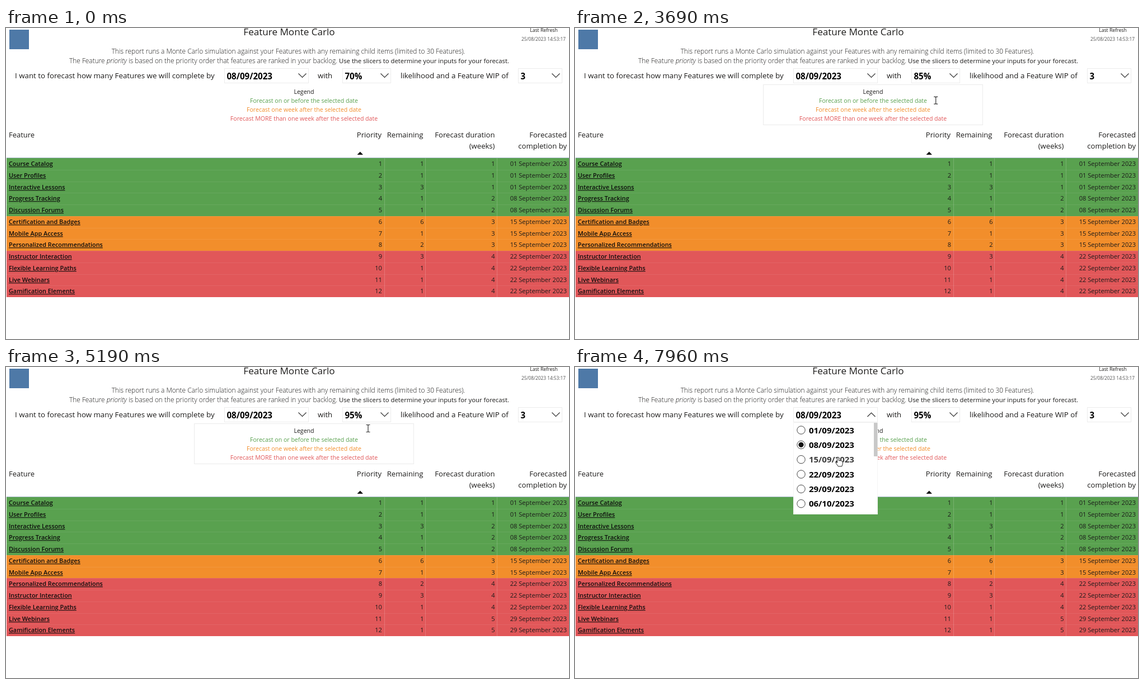
Recreate the animation shown at these times as an HTML page. Size 1006 px wide and 557 px high, loop 8 s.

```html
<!DOCTYPE html>
<html lang="en">
<head>
<meta charset="utf-8">
<title>Feature Monte Carlo</title>
<style>
  html, body { margin: 0; width: 100%; height: 100%; overflow: hidden; background: #fff; }
  svg { display: block; width: 100%; height: 100%; }
  text { font-family: "Open Sans", "Noto Sans", sans-serif; white-space: pre; }
</style>
</head>
<body>
<svg id="stage" viewBox="0 0 1006 557"></svg>
<script>
const LOOP = 8000, STEP = 70;
const INK = '#1c1b1a', GREEN = '#59a14f', ORANGE = '#f28e2b', RED = '#e15759';
const ROW_TOP = 233, ROW_H = 20.75, OPTION_H = 26.35, POPUP_TOP = 99;
const stage = document.getElementById('stage');

function add(parent, tag, attrs = {}, content) {
  const node = document.createElementNS('http://www.w3.org/2000/svg', tag);
  for (const key in attrs) node.setAttribute(key, attrs[key]);
  if (content !== undefined) node.textContent = content;
  return parent.appendChild(node);
}
const group = (parent = stage) => add(parent, 'g');
const rect = (parent, x, y, width, height, attrs) => add(parent, 'rect', { x, y, width, height, ...attrs });
const path = (parent, d, attrs) => add(parent, 'path', { d, fill: 'none', ...attrs });
const text = (parent, x, y, size, content, attrs) =>
  add(parent, 'text', { x, y, 'font-size': size, fill: INK, ...attrs }, content);
const show = (node, on) => { node.style.display = on ? '' : 'none'; };
const END = { 'text-anchor': 'end' }, MIDDLE = { 'text-anchor': 'middle' };
const LIGHT = { 'font-weight': 300 }, BOLD = { 'font-weight': 700, fill: '#000' };

// Heading
rect(stage, 6, 3, 35, 35, { fill: '#4e79a7' });
text(stage, 506, 12.5, 17.1, 'Feature Monte Carlo', MIDDLE);
text(stage, 961, 6.5, 8.7, 'Last Refresh', MIDDLE);
text(stage, 960.5, 23, 8.3, '25/08/2023 14:53:17', { ...MIDDLE, fill: '#555' });
text(stage, 504.5, 45.5, 11.88, 'This report runs a Monte Carlo simulation against your Features with any remaining child items (limited to 30 Features).', { ...MIDDLE, ...LIGHT });
const intro = text(stage, 592, 62.5, 11.88, '', { ...END, ...LIGHT });
add(intro, 'tspan', {}, 'The Feature ');
add(intro, 'tspan', { 'font-style': 'italic' }, 'priority');
add(intro, 'tspan', {}, ' is based on the priority order that features are ranked in your backlog.');
text(stage, 595, 62.5, 11.3, 'Use the slicers to determine your inputs for your forecast.');
text(stage, 16, 89.5, 13.3, 'I want to forecast how many Features we will complete by');
text(stage, 557, 89.5, 13.1, 'with');
text(stage, 705, 89.5, 13.35, 'likelihood and a Feature WIP of');

// Legend
const legendFrame = rect(stage, 336.5, 101.5, 392, 72, { fill: 'none', stroke: '#ebebeb' });
[['Legend', INK],
 ['Forecast on or before the selected date', GREEN],
 ['Forecast one week after the selected date', ORANGE],
 ['Forecast MORE than one week after the selected date', RED]
].forEach(([label, fill], i) => text(stage, 532.5, 118 + i * 16, 10.58, label, { ...MIDDLE, fill }));

// Table
const features = [
  ['Course Catalog', 1], ['User Profiles', 1], ['Interactive Lessons', 3],
  ['Progress Tracking', 1], ['Discussion Forums', 1], ['Certification and Badges', 6],
  ['Mobile App Access', 1], ['Personalized Recommendations', 2], ['Instructor Interaction', 3],
  ['Flexible Learning Paths', 1], ['Live Webinars', 1], ['Gamification Elements', 1]
];
text(stage, 5, 195.5, 13, 'Feature');
text(stage, 671, 195.5, 13.05, 'Priority', END);
text(stage, 745.5, 195.5, 13.1, 'Remaining', END);
text(stage, 873.5, 195.5, 13.1, 'Forecast duration', END);
text(stage, 873.5, 215.5, 13.1, '(weeks)', END);
text(stage, 1002, 195.5, 13.1, 'Forecasted', END);
text(stage, 1002, 215.5, 13.1, 'completion by', END);
path(stage, 'M627.5 227h10.5l-5.2-5.5z', { fill: '#111' });

function buildTable(weeks) {
  const table = group();
  features.forEach(([name, remaining], i) => {
    const top = Math.round(ROW_TOP + i * ROW_H), base = top + 14.2, w = weeks[i];
    const bottom = Math.round(ROW_TOP + (i + 1) * ROW_H);
    const fill = w <= 2 ? GREEN : w === 3 ? ORANGE : RED;
    rect(table, 1, top, 1005, bottom - top, { fill });
    if (i) path(table, `M1 ${top + 0.5}H1006`, { stroke: '#fff', 'stroke-opacity': 0.08 });
    text(table, 5, base, 10.85, name, { fill: '#0c0c0c', 'font-weight': 600, 'text-decoration': 'underline' });
    const day = String(7 * w - 6).padStart(2, '0');
    [[672, i + 1], [746.5, remaining], [873.5, w], [1002, `${day} September 2023`]]
      .forEach(([x, value]) => text(table, x, base, 11.15, value, END));
  });
  for (const x of [676.5, 749.5, 877.5])
    path(table, `M${x} ${ROW_TOP}V482`, { stroke: '#fff', 'stroke-opacity': 0.18 });
  path(table, 'M1 232.5H1006', { stroke: '#a9bccb' });
  return table;
}
const tableBefore = buildTable([1, 1, 1, 2, 2, 3, 3, 3, 4, 4, 4, 4]);
const tableAfter = buildTable([1, 1, 2, 2, 2, 3, 3, 4, 4, 4, 5, 5]);

// Slicers
function buildSlicer(x, width, value, options = []) {
  const right = x + width;
  const hover = group();
  rect(hover, x - 7.5, 64.5, width + 15, 43, { fill: '#fff', stroke: '#ececec' });
  rect(hover, right - 71, 40, 75, 24, { fill: '#fff', opacity: 0.8 });
  const icons = add(hover, 'g', { stroke: '#777', fill: 'none', transform: `translate(${right - 688} 0)` });
  path(icons, 'M622.5 45.5h14l-5.5 6.5v7l-3-2v-5z');
  path(icons, 'M656 46.5h-5.5v12h13v-5M658.5 45.5h6v6M664 46l-7 7');
  for (const cx of [677.5, 684, 690.5]) add(icons, 'circle', { cx, cy: 51.5, r: 1.4, fill: '#777', stroke: 'none' });

  rect(stage, x + 0.5, 72.5, width - 1, 26, { fill: '#fff', stroke: '#ececec' });
  const label = text(stage, x + 4.5, 92, 15.1, value, BOLD);
  const chevron = path(stage, '', { stroke: '#333', 'stroke-width': 1.2 });

  const popup = group();
  rect(popup, x + 0.5, POPUP_TOP + 0.5, width - 1, 164, { fill: '#fff', stroke: '#f4f4f4' });
  const list = group(popup);
  const items = options.map((option, i) => {
    const cy = 113 + i * OPTION_H;
    add(list, 'circle', { cx: x + 14, cy, r: 7.2, fill: '#fff', stroke: '#444' });
    const dot = add(list, 'circle', { cx: x + 14, cy, r: 4.6, fill: '#111' });
    return { option, dot, caption: text(list, x + 28, cy + 5.5, 15, option, BOLD) };
  });

  function update({ current = value, hovered = false, open = false, ready = false, row = -1 } = {}) {
    label.textContent = current;
    show(hover, hovered);
    show(popup, open);
    show(list, ready);
    const tip = ready ? -7 : 7;
    chevron.setAttribute('d', `M${right - 18.5} ${ready ? 89 : 81.5}l7 ${tip}l7 ${-tip}`);
    items.forEach(({ option, dot, caption }, i) => {
      show(dot, option === current);
      caption.setAttribute('fill', i === row ? '#3c3c3c' : '#000');
    });
  }
  update();
  return { update, list };
}
const percent = buildSlicer(601, 87, '70%', ['95%', '85%', '70%', '50%', '25%', '5%']);
const date = buildSlicer(390, 151, '08/09/2023',
  ['01/09/2023', '08/09/2023', '15/09/2023', '22/09/2023', '29/09/2023', '06/10/2023']);
rect(date.list, 534, 100, 6.5, 60, { fill: '#c8c8c8' });
buildSlicer(915, 79, '3');

// Loading dots beside each visual
const dots = group();
for (const [cx, cy] of [[8, 4], [918, 13], [7, 86], [393, 79], [604, 79], [918, 79], [347, 117]])
  add(dots, 'circle', { cx, cy, r: 1.3, fill: '#555' });

// Pointers, each drawn around its hot spot
const pointer = group();
const shapes = {
  arrow: path(pointer, 'M0 0v13l3-2.8l2.2 4.8l2.3-1l-2.2-4.7h4.2z', { fill: '#fff', stroke: '#222' }),
  beam: path(pointer, 'M-3.5-6.5h2.5l1 1l1-1h2.5M0-5.5v11M-3.5 6.5h2.5l1-1l1 1h2.5', { stroke: '#333', 'stroke-width': 1.2 }),
  hand: path(pointer, 'M-1.5 1.5q1.5-2 3 0v5.5q1.5-1.5 2.5 0q1.5-1 2.3.5q2-.5 2 1.5v3.5l-1.5 4.5h-6.5l-4.5-6.5q0-2 2.7 0z', { fill: '#fff', stroke: '#222' })
};

// time, x, y
const track = [
  [780, 1000, 146], [1340, 657, 87], [2130, 657, 87], [2940, 644, 137],
  [3620, 644, 137], [4090, 649, 88], [4360, 649, 88], [4850, 647, 110],
  [6110, 647, 110], [6590, 521, 117], [6940, 470, 88], [7130, 470, 88],
  [7770, 470, 141], [7960, 470, 161]
];
function pointerAt(t) {
  const next = track.findIndex(key => key[0] > t);
  if (next < 1) return track[next < 0 ? track.length - 1 : 0].slice(1);
  const [t0, x0, y0] = track[next - 1], [t1, x1, y1] = track[next];
  const k = Math.floor((t - t0) / STEP) * STEP / (t1 - t0);
  return [x0 + (x1 - x0) * k, y0 + (y1 - y0) * k];
}

const within = (t, ...spans) => spans.some(([from, to]) => t >= from && t < to);

function render(t) {
  const [x, y] = pointerAt(t), visible = t >= 780;
  const percentOpen = within(t, [1870, 3100], [4290, 4980]);
  const percentReady = within(t, [1940, 3100], [4360, 4980]);
  const dateOpen = t >= 7060, dateReady = t >= 7130;
  const anyOpen = percentOpen || dateOpen;
  const over = (left, right) => visible && x > left && x < right && y > 64 && y < 101;
  const row = y > POPUP_TOP ? Math.floor((y - POPUP_TOP) / OPTION_H) : -1;
  const inLegend = visible && !anyOpen && x > 337 && x < 729 && y > 101 && y < 174;

  percent.update({
    current: t < 3100 ? '70%' : t < 5050 ? '85%' : '95%',
    hovered: over(594, 696), open: percentOpen, ready: percentReady, row
  });
  date.update({ hovered: over(383, 549), open: dateOpen, ready: dateReady, row });
  show(legendFrame, inLegend);
  show(tableBefore, t < 5120);
  show(tableAfter, t >= 5120);
  show(dots, within(t, [3100, 3150], [4980, 5120]));

  const kind = dateReady && row >= 0 ? 'hand' : inLegend || (percentReady && row >= 0) ? 'beam' : 'arrow';
  for (const name in shapes) show(shapes[name], name === kind);
  show(pointer, visible);
  pointer.setAttribute('transform', `translate(${x} ${y})`);
}

const start = performance.now();
function tick() {
  render((performance.now() - start) % LOOP);
  requestAnimationFrame(tick);
}
tick();
</script>
</body>
</html>
```
